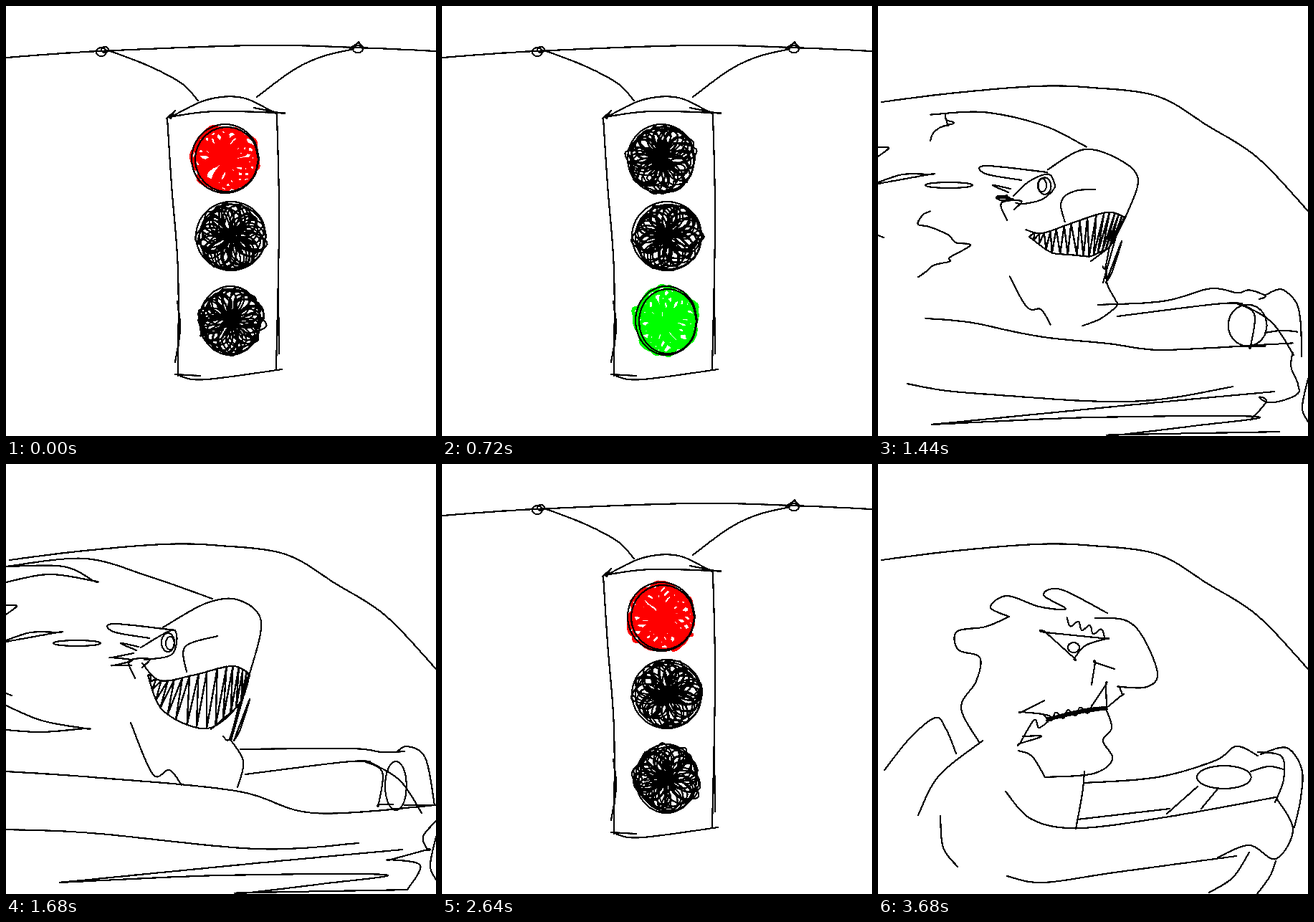
Recreate the animation shown at these times as an HTML page with a canvas. Size 600 by 600 pixels, loop 3.76 s.

```html
<!DOCTYPE html>
<html lang="en">
<head>
<meta charset="utf-8">
<title>Traffic light</title>
<style>
html, body { margin: 0; width: 100%; height: 100%; overflow: hidden; background: #fff; }
canvas { display: block; filter: contrast(60); } /* hard pencil edges */
</style>
</head>
<body>
<canvas id="stage" width="600" height="600"></canvas>
<script>
const LOOP = 3760, STEP = 80, SAMPLES = 100;
const ctx = document.getElementById('stage').getContext('2d');
ctx.lineCap = ctx.lineJoin = 'round';

// "x,y x,y": a trailing c doubles the point, which makes a corner
const parse = text => text.split(' ').flatMap(p => {
  const point = p.split(',').map(parseFloat);
  return p.endsWith('c') ? [point, point] : [point];
});

const spline = (a, b, c, d, t) =>
  b + t * ((c - a) / 2 + t * (a - 2.5 * b + 2 * c - d / 2 + t * (1.5 * (b - c) + (d - a) / 2)));

function smooth(points, count = SAMPLES) {
  const last = points.length - 1;
  return Array.from({ length: count + 1 }, (_, i) => {
    const u = i / count * last, k = Math.min(last - 1, Math.floor(u));
    const [a, b, c, d] = [k - 1, k, k + 1, k + 2].map(j => points[Math.max(0, Math.min(last, j))]);
    return [0, 1].map(axis => spline(a[axis], b[axis], c[axis], d[axis], u - k));
  });
}

const oval = (x, y, rx, ry = rx, turns = 1) => Array.from({ length: 12 * turns + 1 }, (_, i) =>
  [x + rx * Math.cos(i * Math.PI / 6), y + ry * Math.sin(i * Math.PI / 6)]);

const zigzag = (x1, y1, x2, y2, turns, size) => Array.from({ length: turns + 1 }, (_, i) => {
  const u = i / turns, side = (i % 2 ? size : -size) / Math.hypot(x2 - x1, y2 - y1);
  return [x1 + (x2 - x1) * u - (y2 - y1) * side, y1 + (y2 - y1) * u + (x2 - x1) * side];
});

const curves = strokes => Object.fromEntries(Object.entries(strokes).map(
  ([name, s]) => [name, smooth(typeof s === 'string' ? parse(s) : s)]));

const lamp = curves({
  wire: '0,72 130,63 350,55 490,58 600,63',
  hookL: oval(133, 64, 7, 6), knotL: oval(138, 61, 5, 4),
  hookR: oval(491, 60, 7, 5), knotR: '480,59 492,51c 499,58',
  hangL: '143,62 200,84 245,108 268,132',
  hangR: '350,127 400,90 440,71 485,60',
  cap: '228,156 280,131 330,128 378,151',
  rim: '227,155 290,147 381,149c 346,142', corner: '224,157 235,147c 230,157',
  left: '225,156 231,250 240,370 240,516', left2: '239,412 243,450 236,497',
  right: '378,152 381,300 377,507', right2: '380,400 381,485',
  base: '240,508 245,517 280,521 385,507', base2: '236,514 271,516'
});

const windshield = smooth(parse('5,134 100,122 220,112 300,114 390,126 460,167 530,212 600,286'));

const column = { column: '462,598 495,577 518,542', column2: '529,600 547,575 555,554' };
const cabin = {
  ...column,
  seat: '9,427 45,382 80,354 95,370 109,404',
  wheel: '534,405 570,396 591,425 590,465 581,507',
  rim: '530,402 563,408 566,440 554,472',
  spoke: '520,429 545,422 566,426'
};

const calm = curves({
  ...cabin,
  crest: '183,213 157,200 180,184 225,199 262,202 231,183 255,175 320,208',
  hair: '183,213 150,227 110,234 112,259 142,270 137,303 116,340 141,388',
  shoulder: '56,490 85,435 146,386',
  brow: zigzag(262, 219, 318, 238, 7, 5),
  eye: '322,244 234,235c 274,271c 290,253 322,243',
  iris: oval(273, 256, 8, 7, 2),
  snout: '303,215 345,218 370,242 390,292 375,311 337,311c 341,322c 318,341',
  nostril: '298,308 303,277c 330,286',
  tooth: '298,338 318,308c 319,341',
  mouthTop: '235,355 285,343 318,339', mouthLow: '235,358 285,347 320,342',
  curl: '232,330 201,346c 240,352 225,368 218,357 198,390c 228,380 202,380',
  stitch: zigzag(232, 355, 300, 341, 8, 5),
  jaw: '318,341 326,368 314,386 327,412 300,432 233,437',
  throat: '233,437 215,408 196,400',
  armTop: '178,457 215,496 280,508 400,493 555,465',
  fist: '555,465 579,510 555,551 518,532 474,549',
  armLow: '180,575 230,584 330,570 500,547',
  back: '87,491 91,535 111,562',
  sleeve: '288,429 285,460 276,509',
  farArm: '288,445 390,437 470,414 500,394 530,407',
  farLow: '278,496 407,481',
  hand: oval(483, 437, 38, 16),
  thumb: '403,488 446,450', thumb2: '451,481 475,452'
});

const gape = curves({
  ...cabin,
  ear: '170,219 120,201 95,172 70,157c 130,163 228,199',
  crest: '171,163 200,170 270,179 295,208', tuft: '171,165 190,166 202,192',
  hair: '170,219 120,220 70,235c 92,255 98,277 146,287 98,325 135,335 122,345 133,367 131,388',
  collar: '89,418 108,396 142,391',
  shoulder: '104,468 70,456c 90,420 125,390',
  snout: '260,229 295,209 345,243 372,270 352,298',
  nostril: '272,316 266,288 290,272 314,277',
  eye: '191,277 212,248 244,237 256,256c 225,275 193,282 191,277',
  iris: oval(241, 254, 9, 10, 2), lash: zigzag(187, 268, 202, 250, 5, 6),
  mouthTop: '228,358 262,328 320,298 352,298',
  mouthLow: '228,358 275,352 312,326c 318,343 352,298',
  tooth: '311,338 318,345 328,341',
  jaw: '328,340 320,380 335,414c 290,432 235,440',
  throat: '235,440 222,410 196,398',
  armTop: '155,445 190,452 240,485 320,482 400,467 550,463',
  fist: '550,463 583,510 570,557 518,536 465,556',
  armLow: '95,550 150,573 270,578 380,566 500,534',
  back: '66,475 75,510 95,550',
  sleeve: '283,431 282,463 276,487',
  farArm: '280,442 390,432 440,391 490,401 510,389 537,408 500,420',
  hand: oval(478, 441, 43, 22),
  fingers: zigzag(553, 450, 580, 512, 9, 7),
  claw: zigzag(480, 543, 546, 550, 5, 6)
});

const speed = curves({
  crest: '0,143 110,132 200,157 288,188',
  ear: '0,165 60,154 122,163c 80,143 0,143',
  hair: '0,337 50,358 110,369c 50,374 0,371',
  streak: '0,197 15,198 0,210', streak2: '0,246 35,235 72,235c 0,248',
  streak3: oval(99, 250, 33, 4), streak4: '0,320 8,323',
  snout: '219,228 280,194 325,190 356,220 340,293',
  nostril: '252,290 250,255 295,240',
  brow: '236,232 150,223 150,234 200,243',
  eye: '188,256 234,232 232,265 193,273',
  cheek: '180,299 172,275 200,272 190,284',
  iris: oval(226, 249, 9, 13, 2), pupil: oval(229, 250, 6, 9),
  lash: '178,264 148,270c 176,274 150,281c 175,281', lash2: '182,260 160,250 185,255',
  mouthTop: '190,278 215,302 260,295 315,282 340,293',
  mouthLow: '198,295 220,345 280,369 325,335 340,293',
  tooth: '286,370 325,337c 312,383 303,380',
  fang: '318,386 340,328 327,370 318,386', fang2: '340,293 314,386',
  jaw: '312,383 331,415 323,451',
  throat: '245,448 228,427 205,433 174,361',
  armTop: '0,429 120,437 320,456 430,487 600,476',
  armLow: '0,510 120,515 350,537 492,529',
  farArm: '327,398 480,397 525,402 556,401',
  farLow: '334,433 470,416 508,415 476,415',
  grip: '508,416 550,442 580,487', grip2: '500,415 525,430 520,475c 540,475',
  hand: oval(544, 449, 15, 34),
  wheel: '545,402 560,394 585,410 598,476', spoke: '556,476 600,476',
  fist: '600,498 582,520 588,538c 537,552c 578,560 560,594',
  knob: '600,520 592,560 600,580',
  leg: '75,584 360,556 553,538',
  leg2: '75,584 300,574 529,573 440,586 340,598c 560,594'
});

const brake = curves({
  ...column,
  crest: '37,176 150,173 260,147 330,155 389,164',
  streak: '195,175 280,159 355,157c 260,165 195,175',
  streak2: '325,162 222,183 372,173c 310,199', streak3: '270,165 323,162',
  streak4: '85,193 140,184 85,195',
  ear: '110,174 187,171c 100,187 40,213c 70,235 124,231',
  hair: '124,231 0,262 95,278 18,314c 55,309',
  spike: '0,331 105,326c 8,373 25,378', spike2: '70,374 130,385 161,398c 115,390',
  spike3: '15,256 20,246 38,238',
  collar: '120,394 178,402',
  seat: '44,388 22,420 24,441',
  shoulder: '34,507 65,445 122,392',
  snout: '312,199 345,188 410,182 428,210 398,280 375,293',
  nostril: '263,272 300,247 343,276',
  eye: '226,220 282,230 265,257c 226,220',
  iris: oval(266, 239, 10, 11, 2), pupil: oval(264, 240, 5, 7),
  mouthTop: '202,297 260,307 320,302 382,291',
  mouthLow: '202,297 235,333 290,343 370,318 382,291',
  tooth: '342,357 362,322c 300,346',
  jaw: '342,357 354,385 350,410',
  throat: '255,441 215,405 195,360',
  armTop: '132,437 200,457 330,408 400,415 455,456',
  armLow: '60,546 95,582 170,592 260,579 380,594 485,543',
  fist: '570,475 580,520 555,552 515,541 485,543',
  farArm: '412,414 480,401 530,379 537,402',
  hand: '536,435 460,437 480,447 447,465 527,457',
  rim: '525,402 575,397 582,425 537,430', cap: oval(580, 413, 4, 13),
  spoke: '552,432 553,465',
  wheel: '582,425 588,465 580,500'
});

function draw(points, width = 2.2, color = '#000') {
  ctx.strokeStyle = color;
  ctx.lineWidth = width;
  ctx.beginPath();
  points.forEach(p => ctx.lineTo(...p));
  ctx.stroke();
}

function random(seed) {
  return () => {
    seed = (seed * 1664525 + 1013904223) >>> 0;
    return seed / 4294967296;
  };
}

// Small loops whose centre circles round the bulb
function scribble(x, y, color, seed) {
  const rnd = random(seed * 7919 + 17), dark = color === '#000';
  const count = dark ? 190 : 110, start = rnd() * 7;
  const points = Array.from({ length: count }, (_, i) => {
    const loop = start + i * 1.3, orbit = start - i * 0.23;
    const size = 17 + 8 * rnd(), away = 20 + 8 * rnd();
    return [x + away * Math.cos(orbit) + size * Math.cos(loop),
            y + away * Math.sin(orbit) + size * Math.sin(loop)];
  });
  draw(smooth(points, count * 6), dark ? 2.2 : 5, color);
}

const bulbs = [[306, 213, 47], [314, 321, 49], [313, 439, 43]];

function drawLamp(lit, color, tick) {
  Object.values(lamp).forEach(s => draw(s));
  bulbs.forEach(([x, y, r], i) => {
    scribble(x, y, i === lit ? color : '#000', tick * 3 + i);
    draw(smooth(oval(x, y, r, 48)));
    draw(smooth(oval(x + 2, y + 1, r - 3, 45)));
  });
}

function hatch(top, low, lines = 18, slant = 0.15) {
  const at = (curve, u) => curve[Math.round(Math.min(1, u) * SAMPLES)];
  const strokes = Array.from({ length: lines }, (_, i) => [at(low, i / lines), at(top, i / lines + slant)]);
  draw(strokes.flat(), 2.4);
}

function drawDriver(from, to, t) {
  const pose = { ...(t < 0.5 ? from : to) };
  for (const name in from) {
    if (to[name]) pose[name] = from[name].map(([x, y], i) =>
      [x + (to[name][i][0] - x) * t, y + (to[name][i][1] - y) * t]);
  }
  draw(windshield);
  Object.values(pose).forEach(s => draw(s));
  hatch(pose.mouthTop, pose.mouthLow);
}

const easeOut = u => 1 - (1 - u) ** 3;
const scenes = [
  { end: 480, show: (u, tick) => drawLamp(0, '#f00', tick) },
  { end: 960, show: (u, tick) => drawLamp(2, '#0f0', tick) },
  { end: 1120, show: u => drawDriver(calm, gape, u) },
  { end: 1680, show: u => drawDriver(gape, speed, u) },
  { end: 1920, show: () => drawDriver(speed, speed, 1) },
  { end: 2240, show: (u, tick) => drawLamp(2, '#0f0', tick) },
  { end: 2560, show: (u, tick) => drawLamp(1, '#ff0', tick) },
  { end: 2880, show: (u, tick) => drawLamp(0, '#f00', tick) },
  { end: 3120, show: u => drawDriver(speed, brake, u) },
  { end: 3680, show: u => drawDriver(brake, calm, easeOut(u)) },
  { end: LOOP, show: () => drawDriver(calm, calm, 1) }
];

function render(t) {
  ctx.fillStyle = '#fff';
  ctx.fillRect(0, 0, 600, 600);
  const i = scenes.findIndex(scene => t < scene.end), start = i ? scenes[i - 1].end : 0;
  scenes[i].show((t - start) / (scenes[i].end - start), t / STEP);
}

let shown = -1;
function frame() {
  const t = Math.floor(performance.now() % LOOP / STEP) * STEP;
  if (t !== shown) render(shown = t);
  requestAnimationFrame(frame);
}
frame();
</script>
</body>
</html>
```
